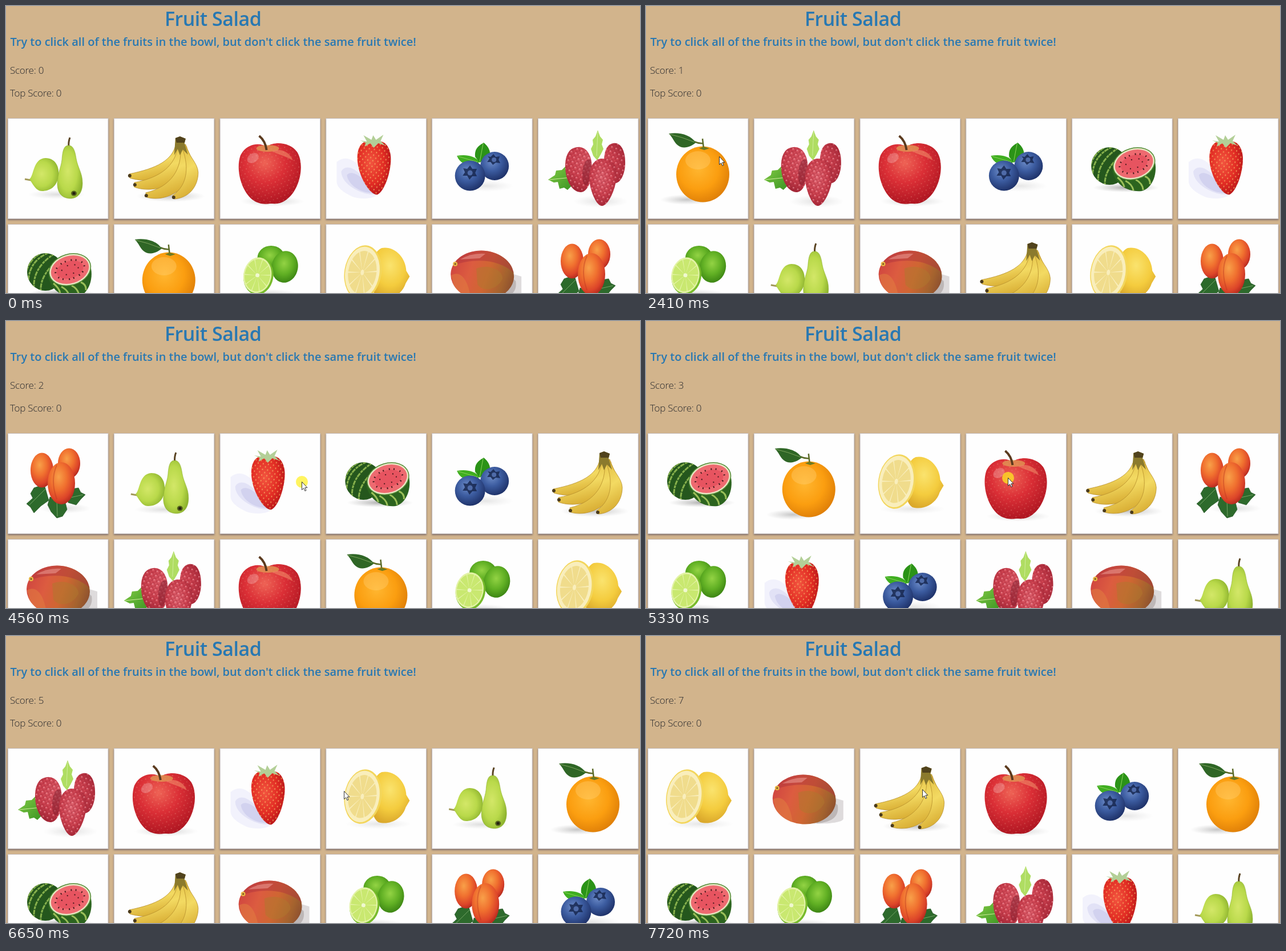
Animation, 1111 px wide and 504 px high, one loop 8000 ms. Source, as an HTML page:

```html
<!DOCTYPE html>
<html lang="en">
<head>
<meta charset="utf-8">
<title>Fruit Salad</title>
<style>
  html, body { margin: 0; width: 100%; height: 100%; overflow: hidden; background: #d2b48c; }
  svg { display: block; width: 1111px; height: 504px; }
  text { font-family: "Open Sans", "Noto Sans", sans-serif; white-space: pre; }
  .head { fill: #2878b2; font-weight: 600; }
  .title { font-size: 34px; letter-spacing: -.5px; }
  .lead { font-size: 20px; }
  .stat { fill: #2b2b2e; font-size: 17px; font-weight: 300; letter-spacing: -.25px; }
  .card { fill: #fefefe; stroke: #cbc5c6; filter: drop-shadow(.5px 2px 1.5px rgba(76, 70, 90, .6)); }
</style>
</head>
<body>
<svg viewBox="0 0 1111 504">
  <defs>
    <radialGradient id="shade"><stop offset="0" stop-color="#777" stop-opacity=".6"/><stop offset="1" stop-color="#999" stop-opacity="0"/></radialGradient>
    <radialGradient id="pearG" cx=".42" cy=".48" r=".62"><stop offset="0" stop-color="#d3e768"/><stop offset=".6" stop-color="#b9d94a"/><stop offset="1" stop-color="#8db32e"/></radialGradient>
    <linearGradient id="banG" x1=".3" y1="0" x2=".6" y2="1"><stop offset="0" stop-color="#e0bb40"/><stop offset=".5" stop-color="#f3da62"/><stop offset="1" stop-color="#d6a92f"/></linearGradient>
    <radialGradient id="appG" cx=".42" cy=".32" r=".72"><stop offset="0" stop-color="#ee6355"/><stop offset=".45" stop-color="#db2f36"/><stop offset="1" stop-color="#ab1420"/></radialGradient>
    <radialGradient id="strG" cx=".4" cy=".4" r=".65"><stop offset="0" stop-color="#f2553f"/><stop offset=".6" stop-color="#e22d24"/><stop offset="1" stop-color="#b81519"/></radialGradient>
    <radialGradient id="bluG" cx=".4" cy=".35" r=".65"><stop offset="0" stop-color="#6d8cc8"/><stop offset=".5" stop-color="#3c5ca0"/><stop offset="1" stop-color="#20346c"/></radialGradient>
    <radialGradient id="rasG" cx=".45" cy=".4" r=".62"><stop offset="0" stop-color="#e26672"/><stop offset=".6" stop-color="#cf4351"/><stop offset="1" stop-color="#a52737"/></radialGradient>
    <radialGradient id="oraG" cx=".42" cy=".4" r=".62"><stop offset="0" stop-color="#ffb630"/><stop offset=".6" stop-color="#fb9e10"/><stop offset="1" stop-color="#e08008"/></radialGradient>
    <radialGradient id="limG" cx=".45" cy=".4" r=".62"><stop offset="0" stop-color="#93d344"/><stop offset=".55" stop-color="#61b024"/><stop offset="1" stop-color="#3b8413"/></radialGradient>
    <radialGradient id="lemG" cx=".5" cy=".35" r=".65"><stop offset="0" stop-color="#fae36e"/><stop offset=".6" stop-color="#f4cc3e"/><stop offset="1" stop-color="#dba92c"/></radialGradient>
    <linearGradient id="manG" x1="0" y1=".35" x2="1" y2=".65"><stop offset="0" stop-color="#cf4440"/><stop offset=".3" stop-color="#dc5c40"/><stop offset=".55" stop-color="#cf6632"/><stop offset=".8" stop-color="#a4632e"/><stop offset="1" stop-color="#85482f"/></linearGradient>
    <radialGradient id="aprG" cx=".4" cy=".35" r=".68"><stop offset="0" stop-color="#f8a049"/><stop offset=".45" stop-color="#f0702f"/><stop offset=".8" stop-color="#dc4429"/><stop offset="1" stop-color="#b32a1f"/></radialGradient>
    <linearGradient id="leafG" x2="1" y2="1"><stop offset="0" stop-color="#84cc45"/><stop offset="1" stop-color="#3a9423"/></linearGradient>

    <pattern id="seeds" width="9" height="10" patternUnits="userSpaceOnUse" patternTransform="rotate(8)">
      <g fill="#f7b866"><ellipse cx="2" cy="2.5" rx=".8" ry="1.3"/><ellipse cx="6.5" cy="7.5" rx=".8" ry="1.3"/></g>
    </pattern>
    <pattern id="drupes" width="8" height="8" patternUnits="userSpaceOnUse" patternTransform="rotate(20)">
      <circle cx="4" cy="4" r="3.6" fill="none" stroke="#97202f" stroke-opacity=".45"/><circle cx="3.2" cy="3" r="1.3" fill="#f4a5ac" fill-opacity=".65"/>
    </pattern>
    <pattern id="specks" width="11" height="9" patternUnits="userSpaceOnUse" patternTransform="rotate(15)">
      <g fill="#f6b49a" fill-opacity=".7"><circle cx="2" cy="2" r=".7"/><circle cx="7" cy="6" r=".6"/></g>
    </pattern>
    <clipPath id="melonClip"><ellipse cx="66" cy="84" rx="32" ry="33"/></clipPath>
    <clipPath id="mangoClip"><ellipse cx="88.500" cy="90" rx="55.500" ry="43.500" transform="rotate(4 88 90)"/></clipPath>

    <circle id="wedges" r="5" fill="none" stroke-width="9" pathLength="10" stroke-dasharray=".9 .1"/>
    <path id="appleBody" d="M82 50C96 40 124 42 136 60C149 82 141 125 117 143C105 152 96 150 88 150C78 152 66 150 57 143C37 126 28 90 36 66C46 44 70 42 82 50Z"/>
    <path id="strawBody" d="M85 43C102 35 114 50 114 72C114 95 103 128 91 134C80 137 62 110 57 85C52 62 58 42 72 41Z"/>
    <path id="raspBack" d="M132 44C148 42 154 62 153 82C152 100 144 114 136 114C124 112 116 95 116 76C116 58 121 46 132 44ZM64 52C84 46 95 64 95 88C95 110 87 130 75 130C58 129 48 106 48 84C48 66 54 55 64 52Z"/>
    <path id="raspFront" d="M112 71C130 70 139 82 138 102C137 122 124 154 112 154C102 154 90 124 90 104C90 86 98 72 112 71Z"/>

    <g id="pear">
      <ellipse cx="86" cy="134" rx="50" ry="8" fill="url(#shade)" opacity=".4"/>
      <path d="M30 107L41 109" stroke="#a39a5a" stroke-width="3"/>
      <path d="M38 107C46 102 44 71 66 70C84 70 91 86 89 101C87 120 74 128 60 128C49 128 44 115 38 107Z" fill="url(#pearG)"/>
      <path d="M107 50Q106 42 109 34" fill="none" stroke="#5a4423" stroke-width="3"/>
      <path d="M106 48C115 47 118 58 120 71C123 88 131 96 131 114C131 132 122 141 110 141C96 141 87 132 87 115C87 97 93 89 95 73C96 59 98 48 106 48Z" fill="url(#pearG)" stroke="#8cae32" stroke-width=".6"/>
      <ellipse cx="116" cy="132" rx="5" ry="4.500" fill="#55621d"/><circle cx="116" cy="132" r="2.500" fill="#231f10"/>
    </g>

    <g id="banana">
      <ellipse cx="100" cy="137" rx="60" ry="10" fill="url(#shade)" opacity=".7"/>
      <path d="M110 45L126 46L146 92L118 122L64 118L60 98L96 82Z" fill="#cfa435"/>
      <g fill="url(#banG)" stroke="#b78f2c" stroke-width=".8">
        <path d="M109 45C103 74 76 88 27 98L28 105C50 112 78 110 96 98L118 50Z"/>
        <path d="M112 50C108 82 84 104 36 113L36 121C60 130 96 124 112 104L124 50Z"/>
        <path d="M117 50C120 88 102 120 56 131L58 139C84 146 116 134 128 108L128 50Z"/>
        <path d="M118 48C132 80 132 116 103 136L106 142C132 140 148 120 148 95C147 78 130 66 126 46Z"/>
      </g>
      <path d="M108 35L116 32L126 36L124 44L130 64L121 55L116 65L112 54L106 65Z" fill="#8b7a2d"/>
      <path d="M108 35L116 32L126 36L124 43L110 43Z" fill="#51431d"/>
      <g fill="#4a3a1c"><circle cx="28" cy="101" r="3"/><circle cx="37" cy="117" r="3"/><circle cx="57" cy="136" r="3"/><circle cx="105" cy="139" r="3"/></g>
    </g>

    <g id="apple">
      <ellipse cx="92" cy="146" rx="56" ry="9" fill="url(#shade)" opacity=".5"/>
      <use href="#appleBody" fill="url(#appG)"/>
      <use href="#appleBody" fill="url(#specks)"/>
      <ellipse cx="84" cy="53" rx="20" ry="6" fill="#e2a457" opacity=".7"/>
      <path d="M92 58C104 52 122 58 128 74C114 66 102 64 92 58Z" fill="#f08a68" opacity=".6"/>
      <ellipse cx="58" cy="70" rx="11" ry="8" fill="#fff" opacity=".22" transform="rotate(-35 58 70)"/>
      <path d="M82 56Q80 40 69 31" fill="none" stroke="#5b3a1e" stroke-width="4"/>
    </g>

    <g id="strawberry">
      <path d="M19 77C34 64 58 66 90 134C86 142 60 143 47 138C30 130 20 122 19 112Z" fill="#f2f2fc"/>
      <path d="M27 94C34 80 55 82 87 133C72 138 28 120 27 94Z" fill="#e2e2f6"/>
      <path d="M37 100C42 92 60 94 84 131C66 133 40 120 37 100Z" fill="#d2d2ef"/>
      <use href="#strawBody" fill="url(#strG)"/>
      <use href="#strawBody" fill="url(#seeds)"/>
      <path d="M60 39L72 41L66 30L80 38L83 30L88 38L101 29L96 40L104 48L92 44L84 52L78 44L68 50L70 43Z" fill="#b3cf97"/>
    </g>

    <g id="blueberry">
      <ellipse cx="95" cy="119" rx="48" ry="10" fill="url(#shade)" opacity=".3"/>
      <path d="M78 82C66 84 50 82 44 66C60 63 74 66 84 76Z" fill="#3fae20"/>
      <path d="M76 68C74 54 82 48 91 43C98 49 103 56 102 66L84 78Z" fill="#2b9317"/>
      <path d="M90 44L84 76M46 67L80 77" stroke="#8ad15a" fill="none"/>
      <circle cx="110" cy="84" r="25" fill="url(#bluG)"/>
      <circle cx="67" cy="101" r="26.500" fill="url(#bluG)"/>
      <g fill="#182850" opacity=".85">
        <path d="M98 67L103 68L108 63L112 68L119 67L117 73L120 79L112 78L107 82L103 77L97 77L101 71Z"/>
        <path d="M55 88L62 89L67 83L71 89L79 89L76 96L79 102L71 102L66 108L62 101L54 101L58 95Z"/>
      </g>
      <g fill="#4f6ba8"><circle cx="109" cy="73" r="4"/><circle cx="67" cy="96" r="4.500"/></g>
    </g>

    <g id="raspberry">
      <ellipse cx="110" cy="146" rx="48" ry="11" fill="url(#shade)" opacity=".35"/>
      <path d="M97 66L93 54L97 46L96 38L101 32L105 21L109 32L114 38L112 46L115 54L110 64L104 74Z" fill="#afdd62"/>
      <path d="M18 108L30 100L32 92L42 91L50 83L60 96L62 116L52 126L46 122L38 124L35 112L28 113Z" fill="url(#leafG)"/>
      <path d="M105 24L103 66M20 108L58 104" stroke="#d0ec9c" fill="none"/>
      <use href="#raspBack" fill="url(#rasG)"/>
      <use href="#raspBack" fill="url(#drupes)"/>
      <path d="M78 100C78 78 88 68 93 74C96 90 92 110 86 118C80 118 78 110 78 100Z" fill="#7d1a2a" opacity=".5"/>
      <use href="#raspFront" fill="url(#rasG)"/>
      <use href="#raspFront" fill="url(#drupes)"/>
    </g>

    <g id="melon">
      <ellipse cx="95" cy="122" rx="58" ry="8" fill="url(#shade)"/>
      <ellipse cx="66" cy="84" rx="32" ry="33" fill="#25571d"/>
      <g clip-path="url(#melonClip)" fill="none" stroke="#86b04c" stroke-width="3" stroke-dasharray="5 1 8 1.5">
        <path d="M36 104Q36 66 70 51M46 112Q44 76 82 52M58 118Q56 88 92 60M32 88Q36 62 60 50"/>
      </g>
      <path d="M71 92C76 116 96 130 122 128C140 124 150 100 146 78Z" fill="#2c641f"/>
      <path d="M80 104Q90 112 92 121M94 110Q106 116 108 127M112 108Q124 114 125 126M128 102Q138 106 137 116" fill="none" stroke="#9abf58" stroke-width="3"/>
      <g transform="rotate(-17 109 80)">
        <ellipse cx="109" cy="80" rx="38" ry="28" fill="#4f8a34"/>
        <ellipse cx="109" cy="80" rx="36.500" ry="26.500" fill="#e9e6c4"/>
        <ellipse cx="109" cy="80" rx="34" ry="24" fill="#ee6a70"/>
        <ellipse cx="109" cy="80" rx="24" ry="15" fill="#e75460"/>
        <ellipse cx="109" cy="80" rx="26" ry="16" fill="none" stroke="#4b1a1e" stroke-width="3" stroke-dasharray="2 9 2 6"/>
        <ellipse cx="109" cy="80" rx="15" ry="8" fill="none" stroke="#4b1a1e" stroke-width="2" stroke-dasharray="2 11"/>
      </g>
    </g>

    <g id="orange">
      <ellipse cx="68" cy="143" rx="46" ry="9" fill="url(#shade)" opacity=".7"/>
      <ellipse cx="96.500" cy="98.500" rx="46.500" ry="49" fill="url(#oraG)"/>
      <ellipse cx="88" cy="74" rx="22" ry="16" fill="#ffd27a" opacity=".35"/>
      <path d="M81 41Q90 45 98 44M96 36L98 53" fill="none" stroke="#5c6b28" stroke-width="2.500"/>
      <path d="M37 27C55 24 76 29 84 43C76 50 62 56 52 47C46 42 44 34 37 27Z" fill="#2f6626"/>
      <path d="M38 28Q60 33 82 42" fill="none" stroke="#7da45c"/>
      <path d="M90 53L98 50L108 53L99 56Z" fill="#6c7a22"/>
    </g>

    <g id="lime">
      <ellipse cx="85" cy="122" rx="50" ry="8" fill="url(#shade)" opacity=".4"/>
      <ellipse cx="90" cy="59" rx="24" ry="21" fill="url(#limG)"/>
      <ellipse cx="114" cy="75" rx="23" ry="28" fill="url(#limG)" transform="rotate(10 114 75)"/>
      <g transform="rotate(10 67 90)">
        <ellipse cx="68" cy="91" rx="26" ry="33" fill="#78bb2c"/>
        <ellipse cx="66" cy="90" rx="24.500" ry="31.500" fill="#e3f3a6"/>
        <use href="#wedges" stroke="#c9e870" transform="translate(66 90)scale(2.350 3)"/>
        <circle cx="66" cy="90" r="3.500" fill="#f0f8d0"/>
      </g>
    </g>

    <g id="lemon">
      <ellipse cx="92" cy="133" rx="58" ry="9" fill="url(#shade)" opacity=".3"/>
      <path d="M98 42C120 38 140 58 141 82L147 92L140 104C134 124 112 136 92 130C72 116 74 52 98 42Z" fill="url(#lemG)"/>
      <g transform="rotate(9 65 85)">
        <ellipse cx="65" cy="85" rx="32.500" ry="48" fill="#f3d65c"/>
        <ellipse cx="64" cy="85" rx="30" ry="45.500" fill="#f9eebc"/>
        <use href="#wedges" stroke="#f0dc8c" transform="translate(64 85)scale(2.600 4)"/>
        <ellipse cx="64" cy="85" rx="3" ry="5" fill="#f9eebc"/>
      </g>
    </g>

    <g id="mango">
      <path d="M100 132C130 134 157 130 157 124V92L130 84Z" fill="#dedbdc"/>
      <path d="M110 132C140 130 150 118 147 100L130 84Z" fill="#bdb7b7"/>
      <g clip-path="url(#mangoClip)">
        <path d="M30 40H150V140H30Z" fill="url(#manG)"/>
        <path d="M50 40H150V92C124 62 80 58 38 72Z" fill="#b0343c" opacity=".5"/>
        <path d="M78 78C96 70 124 78 124 96C114 116 90 120 80 106Z" fill="#b0782e" opacity=".5"/>
        <path d="M34 90C50 80 64 98 68 130H44Z" fill="#e27a40" opacity=".6"/>
        <path d="M50 62Q70 50 94 52L84 60Z" fill="#ea958c" opacity=".6"/>
      </g>
      <circle cx="41" cy="70" r="4" fill="#e6b445"/><circle cx="41" cy="70" r="1.500" fill="#6e4a22"/>
    </g>

    <g id="apricot">
      <ellipse cx="100" cy="132" rx="46" ry="9" fill="url(#shade)" opacity=".4"/>
      <g fill="#2d6a2c" stroke="#1c4a1e" stroke-width=".6">
        <path d="M64 90L46 96L40 106L44 114L33 124L40 130L46 140L58 128L72 118Z"/>
        <path d="M74 112L70 126L76 138L86 149L96 146L104 134L100 118Z"/>
        <path d="M104 108L112 98L124 96L128 104L136 108L128 116L120 126L106 122Z"/>
      </g>
      <path d="M66 98L38 126M86 116L87 146M106 114L132 108" stroke="#75a566" fill="none"/>
      <g fill="url(#aprG)">
        <ellipse cx="107.500" cy="53" rx="19.500" ry="26.500"/>
        <ellipse cx="60" cy="65" rx="20" ry="30.500"/>
        <ellipse cx="94" cy="88" rx="24" ry="37"/>
      </g>
      <path d="M86 56Q74 82 86 116" fill="none" stroke="#b9331f" stroke-opacity=".4" stroke-width="2"/>
    </g>
  </defs>

  <path d="M0 0H1111V504H0Z" fill="#d2b48c"/>
  <text class="head title" x="278" y="35">Fruit Salad</text>
  <text class="head lead" x="7.500" y="69.500">Try to click all of the fruits in the bowl, but don't click the same fruit twice!</text>
  <text class="stat" x="7" y="118.500">Score: <tspan id="score">0</tspan></text>
  <text class="stat" x="7" y="159">Top Score: 0</text>
  <g id="grid"></g>
  <g id="pointer" visibility="hidden">
    <circle id="click" cx=".5" cy=".5" r="10.500" fill="#fff01c" fill-opacity=".7"/>
    <path d="M.5 .5V14.500L3.700 11.600L5.900 16.500L8 15.500L5.900 10.700H10Z" fill="#fff" stroke="#222" stroke-width=".9"/>
  </g>
</svg>
<script>
  const LOOP = 8000;
  const fruits = {
    p: 'pear', b: 'banana', a: 'apple', s: 'strawberry', u: 'blueberry', r: 'raspberry',
    w: 'melon', o: 'orange', l: 'lime', e: 'lemon', m: 'mango', c: 'apricot'
  };
  // Start time and card order; the index is the score.
  const rounds = [
    [0, 'pbasurwolemc'], [2410, 'orauwslpmbec'], [3700, 'cpswubmraole'], [4640, 'woeabclsurmp'],
    [5480, 'mpewauolrcbs'], [6260, 'rasepowbmlcu'], [7030, 'muorsaecwpbl'], [7720, 'embauowlcrsp']
  ];
  // Pointer positions: time, x, y.
  const moves = [
    [760, 1053, 473], [840, 945, 395], [920, 840, 315], [990, 772, 260], [1070, 747, 240],
    [1380, 477.5, 126], [1460, 287, 169], [1690, 200, 222], [1770, 143, 255], [1850, 128, 264],
    [3090, 165, 274], [3170, 245, 296], [3240, 304, 311], [3320, 321, 313],
    [4180, 395, 302], [4250, 488, 287], [4330, 518, 282], [5100, 600, 277], [5170, 634, 275],
    [6030, 625, 274], [6110, 618, 273], [6570, 610, 273], [6650, 592, 272], [6730, 575, 272],
    [6800, 566, 271], [7340, 530, 270], [7420, 495, 269], [7490, 484, 269]
  ];
  const clicks = [[2160, 2260], [3630, 3700], [4560, 4640], [5330, 5480], [6180, 6260], [6880, 7030], [7640, 7720]];

  const $ = id => document.getElementById(id);
  const add = (tag, attrs) => {
    const el = document.createElementNS('http://www.w3.org/2000/svg', tag);
    for (const k in attrs) el.setAttribute(k, attrs[k]);
    return $('grid').appendChild(el);
  };

  const slots = [...rounds[0][1]].map((_, i) => {
    const x = 3 + i % 6 * 185.8, y = 197 + Math.floor(i / 6) * 186;
    add('rect', { class: 'card', x: x + .5, y: y + .5, width: 175.5, height: 176 });
    return add('use', { x, y });
  });

  let shown = -1;
  function draw(t) {
    const score = rounds.findLastIndex(r => r[0] <= t);
    if (score !== shown) {
      shown = score;
      slots.forEach((slot, i) => slot.setAttribute('href', '#' + fruits[rounds[score][1][i]]));
      $('score').textContent = score;
    }
    const pos = moves.findLast(m => m[0] <= t);
    $('pointer').setAttribute('visibility', pos ? 'visible' : 'hidden');
    if (pos) $('pointer').setAttribute('transform', `translate(${pos[1]} ${pos[2]})`);
    $('click').setAttribute('opacity', clicks.some(([on, off]) => t >= on && t < off) ? 1 : 0);
  }

  const start = performance.now();
  function tick() {
    draw((performance.now() - start) % LOOP);
    requestAnimationFrame(tick);
  }
  tick();
</script>
</body>
</html>
```
